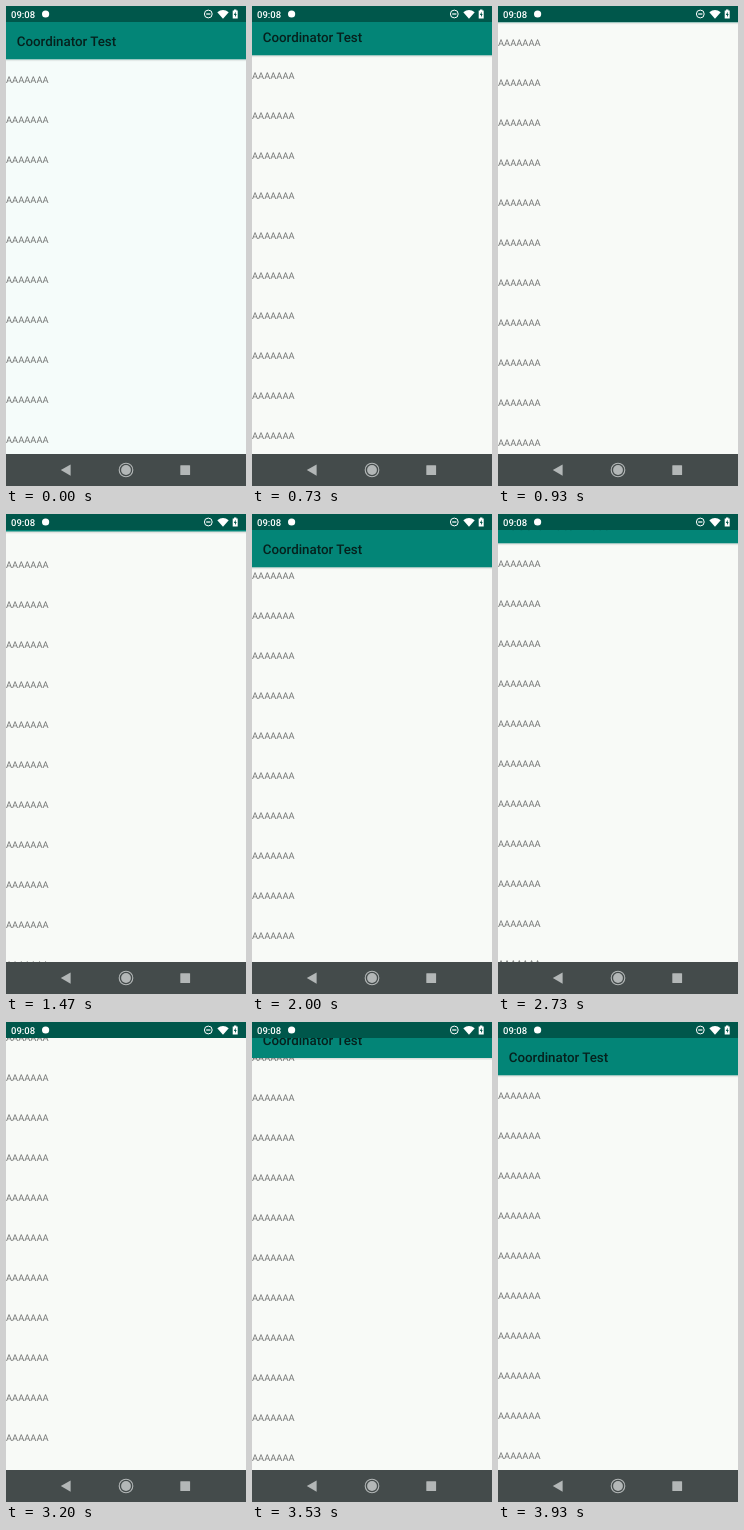
An HTML page for the animation above (3990 ms loop, 240 by 480 pixels).

```html
<!DOCTYPE html>
<html lang="en">
<head>
<meta charset="utf-8">
<title>Collapsing toolbar</title>
<style>
  html, body { margin: 0; width: 100%; height: 100%; overflow: hidden; background: #f8faf7; }
  svg { display: block; width: 100vw; height: 100vh; }
  text { font-family: Roboto, "Noto Sans", sans-serif; text-rendering: geometricPrecision; }
  #list { font-size: 9.33px; fill: #757776; }
  #title { font-size: 13.33px; font-weight: 500; fill: #06211d; }
  #clock { font-size: 9.5px; font-weight: 500; fill: #fff; }
</style>
</head>
<body>
<svg viewBox="0 0 240 480" preserveAspectRatio="none">
  <defs>
    <linearGradient id="shade" x2="0" y2="1">
      <stop offset="0" stop-color="#000" stop-opacity=".14"/>
      <stop offset="1" stop-color="#000" stop-opacity="0"/>
    </linearGradient>
  </defs>
  <rect id="page" width="240" height="480"/>
  <g id="list"></g>

  <g id="bar">
    <rect y="53.3" width="240" height="2.5" fill="url(#shade)"/>
    <rect y="16" width="240" height="37.3" fill="#038577"/>
    <text id="title" x="10.7" y="40">Coordinator Test</text>
  </g>

  <g id="status" fill="#fff">
    <rect width="240" height="16" fill="#00574b"/>
    <text id="clock" x="5" y="11.6">09:08</text>
    <circle cx="39.6" cy="8" r="3.6"/>
    <circle cx="202.3" cy="8" r="3.9" fill="none" stroke="#fff" stroke-width="1"/>
    <rect x="200.2" y="7.4" width="4.2" height="1.2"/>
    <path d="M211.3 6.2Q217 2 222.7 6.2L217 12.7Z"/>
    <path d="M228 3.6h2.4v.9h1.3v8.1h-5v-8.1h1.3Z"/>
    <path d="M229.7 5.8l-1.9 3.2h1.2v2.3l1.7-3.3h-1Z" fill="#00574b"/>
  </g>

  <g id="nav" fill="#b3b7b7">
    <rect y="448" width="240" height="32" fill="#444b4b"/>
    <path d="M64.6 458.4v11.4l-9.8-5.7Z"/>
    <circle cx="120" cy="464" r="6.8" fill="none" stroke="#b3b7b7" stroke-width="1.1"/>
    <circle cx="120" cy="464" r="4.9"/>
    <rect x="174.3" y="459.2" width="9.8" height="9.8" rx=".6"/>
  </g>
</svg>
<script>
const LOOP = 3990, BAR = 37.3;
const $ = id => document.getElementById(id);

// Finger travel in px, one value per tick of 1/15 s, from a starting tick.
const drags = [
  [11, [4, 13, 25, 37, 46, 53, 58, 61.5, 63.5, 64.5]],
  [22, [63, 60, 56, 50, 43, 36, 29, 21, 12, 6, 2, 0]],
  [38, [2, 7, 15, 24, 32, 39, 45, 50, 54, 56.5, 58,
        57, 54, 49, 44, 38, 30, 22, 14, 7, 2, 0]]
];

// The toolbar takes up each movement first, in both directions.
const poses = [{ at: 0, travel: 0, bar: 0 }];
for (const [first, values] of drags) {
  values.forEach((travel, i) => {
    const last = poses[poses.length - 1];
    const bar = Math.max(-BAR, Math.min(0, last.bar + last.travel - travel));
    poses.push({ at: Math.round((first + i) * 100 / 15) * 10, travel, bar });
  });
}

for (let i = 0; i < 12; i++) {
  const row = document.createElementNS("http://www.w3.org/2000/svg", "text");
  row.setAttribute("y", 77.4 + 40 * i);
  row.textContent = "AAAAAAA";
  $("list").append(row);
}

function draw() {
  const t = performance.now() % LOOP;
  const pose = poses.findLast(p => p.at <= t);
  $("list").setAttribute("transform", `translate(0 ${-pose.travel})`);
  $("bar").setAttribute("transform", `translate(0 ${pose.bar})`);
  $("bar").setAttribute("visibility", pose.bar > -BAR ? "visible" : "hidden");
  $("page").setAttribute("fill", pose.at ? "#f8faf7" : "#f5fcfa");
  requestAnimationFrame(draw);
}
draw();
</script>
</body>
</html>
```
